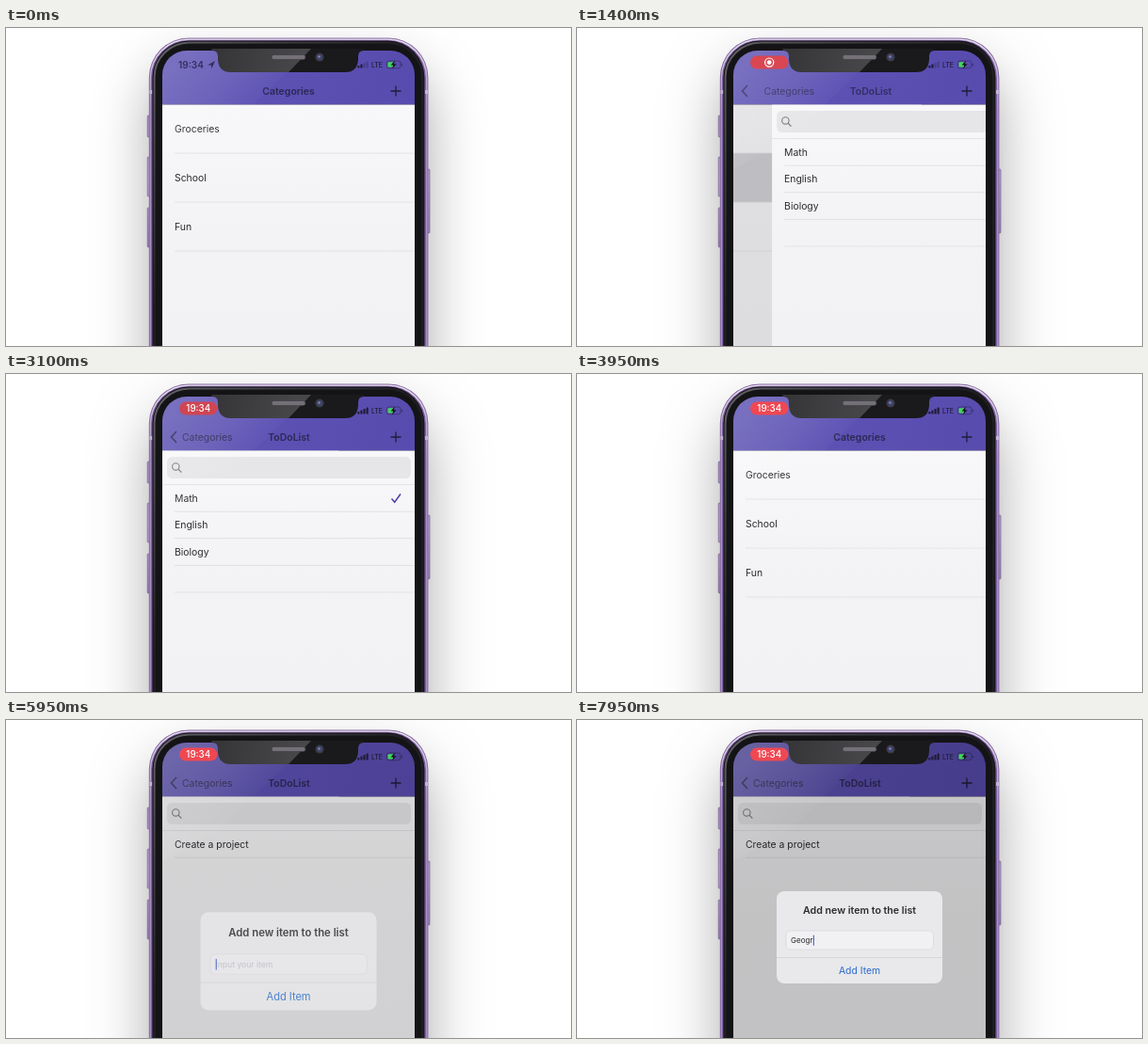
Write an HTML page with a canvas that moves like this. It is 600 px wide and 338 px high and loops after 8 s.

```html
<!DOCTYPE html>
<html lang="en">
<head>
<meta charset="utf-8">
<title>To-do list demo</title>
<style>
  html, body { margin: 0; width: 100%; height: 100%; overflow: hidden; background: #fff; }
  canvas { display: block; width: 100%; height: 100%; }
</style>
</head>
<body>
<canvas id="stage"></canvas>
<script>
const W = 600, H = 338, LOOP = 8000;
const SCREEN = { x: 166, y: 24, w: 268, h: 580 };
const NAV_BOTTOM = 81.3;
const INK = '#2c2b2f', NAV_INK = '#2e2854';

const canvas = document.getElementById('stage');
const dpr = window.devicePixelRatio || 1;
canvas.width = W * dpr;
canvas.height = H * dpr;
const ctx = canvas.getContext('2d');
ctx.scale(dpr, dpr);

const clamp = v => Math.max(0, Math.min(1, v));
const span = (t, start, length) => clamp((t - start) / length);
const easeOut = v => 1 - (1 - v) ** 3;
const smooth = v => v * v * (3 - 2 * v);
const mix = (a, b, p) => a + (b - a) * p;

function rect(x, y, w, h, fill) {
  ctx.fillStyle = fill;
  ctx.fillRect(x, y, w, h);
}

function round(x, y, w, h, r, fill, stroke, width = 1) {
  ctx.beginPath();
  ctx.roundRect(x, y, w, h, r);
  if (fill) { ctx.fillStyle = fill; ctx.fill(); }
  if (stroke) { ctx.strokeStyle = stroke; ctx.lineWidth = width; ctx.stroke(); }
}

function disc(x, y, r, fill) {
  ctx.beginPath();
  ctx.arc(x, y, r, 0, Math.PI * 2);
  ctx.fillStyle = fill;
  ctx.fill();
}

function ring(x, y, r, color, width) {
  ctx.beginPath();
  ctx.arc(x, y, r, 0, Math.PI * 2);
  ctx.strokeStyle = color;
  ctx.lineWidth = width;
  ctx.stroke();
}

function line(points, color, width) {
  ctx.beginPath();
  points.forEach(([x, y]) => ctx.lineTo(x, y));
  ctx.strokeStyle = color;
  ctx.lineWidth = width;
  ctx.stroke();
}

function shape(points, fill) {
  ctx.beginPath();
  points.forEach(([x, y]) => ctx.lineTo(x, y));
  ctx.fillStyle = fill;
  ctx.fill();
}

// y is the middle of the capitals
function text(str, x, y, { size = 10.4, weight = 400, color = INK, align = 'left' } = {}) {
  ctx.font = `${weight} ${size}px Inter, sans-serif`;
  ctx.textAlign = align;
  ctx.fillStyle = color;
  ctx.fillText(str, x, y + size * 0.364);
}

function faded(alpha, draw) {
  if (alpha <= 0) return;
  ctx.save();
  ctx.globalAlpha *= alpha;
  draw();
  ctx.restore();
}

function gradient(x0, y0, x1, y1, ...colors) {
  const g = ctx.createLinearGradient(x0, y0, x1, y1);
  colors.forEach((c, i) => g.addColorStop(i / (colors.length - 1), c));
  return g;
}

function drawBody() {
  ctx.save();
  ctx.shadowColor = 'rgba(0,0,0,0.36)';
  ctx.shadowBlur = 62 * dpr;
  ctx.shadowOffsetY = 30 * dpr;
  round(156, 14, 289, 640, 40, '#777');
  ctx.restore();

  const button = gradient(0, 90, 0, 235, '#a08bb9', '#b59fcd', '#8f78ab');
  [[93, 23], [137, 42], [191, 42]].forEach(([y, h]) =>
    round(150.2, y, 4, h, 1, button, '#6b5784', 0.6));
  round(446, 150, 4, 68, 1, button, '#6b5784', 0.6);

  // outer edge, pale band, inner edge, glass
  round(151.8, 10.5, 296.6, 640, 42, '#84699f');
  round(152.8, 11.4, 294.6, 640, 41, gradient(0, 11, 0, 90, '#efe8f5', '#c4afd8', '#a98fc6'));
  round(154.1, 12.7, 291.8, 640, 40, '#76599c');
  rect(152.5, 66, 3, 4, '#c3b4d4');
  rect(445, 66, 3, 4, '#c3b4d4');
  round(155.4, 13.6, 289, 640, 39, '#141316');
  round(157.6, 15.4, 284.6, 640, 37, null,
    gradient(157, 14, 300, 150, '#66656a', '#3d3c41', '#201f23'), 2);
}

function drawPage() {
  rect(166, NAV_BOTTOM, 268, H, gradient(0, 82, 0, 338, '#f8f7f9', '#f3f2f4', '#f2f1f3'));
}

function drawCategories(dx, highlight) {
  ctx.save();
  ctx.translate(dx, 0);
  drawPage();
  faded(highlight, () => rect(166, 133, 268, 52, '#d0cfd3'));
  ['Groceries', 'School', 'Fun'].forEach((name, i) => {
    text(name, 179, 107.5 + 52 * i);
    rect(179, 132.7 + 52 * i, 255, 0.7, '#dbdade');
  });
  ctx.restore();
}

function drawItems(dx, items, rows, checked) {
  ctx.save();
  ctx.translate(dx, 0);
  drawPage();
  round(171, 88, 259, 23, 5.5, '#e6e5e8');
  ring(180.3, 98.4, 3.7, '#77767b', 1.1);
  line([[183, 101.2], [186.3, 104.5]], '#77767b', 1.2);
  rect(166, 117, 268, 0.7, '#dbdade');
  for (let i = 0; i < rows; i++) {
    const y = 117.5 + 28.6 * i;
    if (items[i]) text(items[i], 179, y + 14.6);
    rect(179, y + 28.3, 255, 0.7, '#dbdade');
  }
  if (checked) line([[409.5, 132.5], [412.7, 136.3], [419, 127.5]], '#4a40a8', 1.5);
  ctx.restore();
}

function drawNav(push) {
  const p = clamp(push / 0.98);
  rect(166, 24, 268, NAV_BOTTOM - 24, gradient(166, 24, 434, 82, '#6157b5', '#5c50b3', '#584bae'));
  const title = { size: 10.5, weight: 600, color: NAV_INK, align: 'center' };
  faded(1 - p * 1.6, () => text('Categories', mix(300, 214, p), 67, title));
  faded(p, () => {
    text('Categories', mix(272, 187, p), 67, { color: NAV_INK });
    text('ToDoList', mix(385, 300.5, p), 67, title);
    line([[181, 61], [175.5, 67], [181, 73]], NAV_INK, 1.6);
  });
  line([[408.5, 67], [419.5, 67]], '#211d38', 1.3);
  line([[414, 61.5], [414, 72.5]], '#211d38', 1.3);
}

function drawGlare() {
  shape([[166, 24], [322, 24], [226, 118], [166, 150]],
    gradient(190, 30, 262, 100, 'rgba(255,255,255,0.15)', 'rgba(255,255,255,0.09)', 'rgba(255,255,255,0)'));
}

function drawStatus(t) {
  const dark = '#352e5e';
  const pill = span(t, 500, 250);
  faded(1 - pill, () => {
    text('19:34', 183, 39, { size: 10, weight: 600, color: dark });
    shape([[214, 39.4], [222, 35], [218.4, 43.2], [217.9, 39.6]], dark);
  });
  const glow = (1 + Math.cos(t * Math.PI / 1000)) / 2;
  faded(pill, () => {
    round(184, 29.6, 40.5, 14, 7, `rgb(${mix(206, 239, glow)},${mix(70, 72, glow)},82)`);
    const clock = span(t, 2900, 200);
    faded(clock, () => text('19:34', 204.2, 36.5, { size: 9.8, weight: 500, color: '#fff', align: 'center' }));
    faded(1 - clock, () => {
      ring(204.2, 36.6, 4.6, '#fff', 1.2);
      disc(204.2, 36.6, 2.4, '#fff');
    });
  });

  const bars = t < 3000 ? 2 : 4;
  for (let i = 0; i < 4; i++) {
    const h = 2.4 + 1.5 * i;
    round(373.3 + 3.1 * i, 42.4 - h, 2.1, h, 0.5, i < bars ? '#1f1b35' : 'rgba(31,27,53,0.3)');
  }
  text('LTE', 388, 39, { size: 7, weight: 500, color: '#1f1b35' });
  round(404.3, 35, 14.6, 7.8, 2.2, null, 'rgba(31,27,53,0.55)', 0.8);
  round(405.5, 36.2, 6, 5.4, 1.2, '#43d65c');
  round(419.8, 37.4, 1.1, 3, 0.5, 'rgba(31,27,53,0.55)');
  shape([[413, 34.4], [408.6, 39.6], [411.2, 39.6], [410, 43.5], [414.6, 38.2], [411.9, 38.2]], '#15131f');
}

function drawNotch() {
  ctx.beginPath();
  ctx.moveTo(218, 22);
  ctx.lineTo(219, 24);
  ctx.quadraticCurveTo(225, 24, 225, 30);
  ctx.lineTo(225, 33);
  ctx.quadraticCurveTo(225.5, 47, 239, 47);
  ctx.lineTo(360, 47);
  ctx.quadraticCurveTo(373.5, 47, 374, 33);
  ctx.lineTo(374, 30);
  ctx.quadraticCurveTo(374, 24, 380, 24);
  ctx.lineTo(381, 22);
  ctx.fillStyle = '#1a191c';
  ctx.fill();
  // reflection that runs on from the glare over the bezel
  ctx.save();
  ctx.clip();
  shape([[218, 20], [326, 20], [299, 48], [218, 48]],
    gradient(222, 24, 312, 40, 'rgba(255,255,255,0.12)', 'rgba(255,255,255,0.2)'));
  ctx.restore();
  round(282, 28.5, 36, 5, 2.5, '#737177', '#3b3a3f', 0.6);
  disc(333, 31, 4.6, '#3b3a43');
  disc(333, 31, 3.1, '#3f4468');
  disc(332.5, 30.5, 1.3, '#7d86b8');
}

function drawAlert(t, p) {
  const scale = 1.2 - 0.2 * p;
  ctx.save();
  ctx.translate(300, mix(312, 231, p));
  ctx.scale(scale, scale);
  ctx.globalAlpha = Math.sqrt(p);
  round(-88, -49, 176, 98, 8, '#e9e8eb');
  text('Add new item to the list', 0, -29, { size: 10.65, weight: 600, align: 'center' });
  round(-78, -7, 156.5, 20, 4.5, mix(0, 1, p) < 1 ? '#e9e8eb' : '#f1f0f3', '#d6d5d9', 0.7);
  rect(-88, 21, 176, 0.7, '#cfced3');
  text('Add Item', 0, 35.5, { color: '#2a6bc9', align: 'center' });

  const size = 8.1;
  const typed = 'Geogr'.slice(0, [6950, 7200, 7450, 7650, 7850].filter(at => t >= at).length);
  if (typed) text(typed, -73, 3.2, { size });
  else text('Input your item', -73, 3.2, { size, color: '#bcbbc1' });
  if (typed || (t - 5700) % 1000 < 600) {
    const width = typed ? ctx.measureText(typed).width : 0;
    rect(-72.8 + width, -2.3, 1.1, 11, '#4a62c8');
  }
  ctx.restore();
}

function drawScreen(t) {
  const first = t < 4200;
  const push = first
    ? easeOut(span(t, 1150, 540)) - easeOut(span(t, 3450, 480))
    : easeOut(span(t, 4650, 540));
  const highlight = first
    ? span(t, 1080, 60) * (1 - span(t, 3500, 400))
    : span(t, 4580, 60);
  const alert = smooth(span(t, 5700, 400));

  ctx.save();
  ctx.beginPath();
  ctx.roundRect(SCREEN.x, SCREEN.y, SCREEN.w, SCREEN.h, 26);
  ctx.clip();

  drawCategories(-0.3 * SCREEN.w * push, highlight);
  if (push > 0) {
    rect(166, NAV_BOTTOM, 268, H, `rgba(0,0,0,${0.1 * push})`);
    const dx = SCREEN.w * (1 - push);
    if (first) drawItems(dx, ['Math', 'English', 'Biology'], 4, true);
    else drawItems(dx, ['Create a project'], 1, false);
  }
  drawNav(push);
  if (alert > 0) {
    rect(166, 24, 268, H, `rgba(0,0,0,${0.2 * alert})`);
    drawAlert(t, alert);
  }
  drawGlare();
  drawStatus(t);
  ctx.restore();
}

function frame(now) {
  const t = now % LOOP;
  rect(0, 0, W, H, '#fff');
  drawBody();
  drawScreen(t);
  drawNotch();
  requestAnimationFrame(frame);
}
requestAnimationFrame(frame);
</script>
</body>
</html>
```
